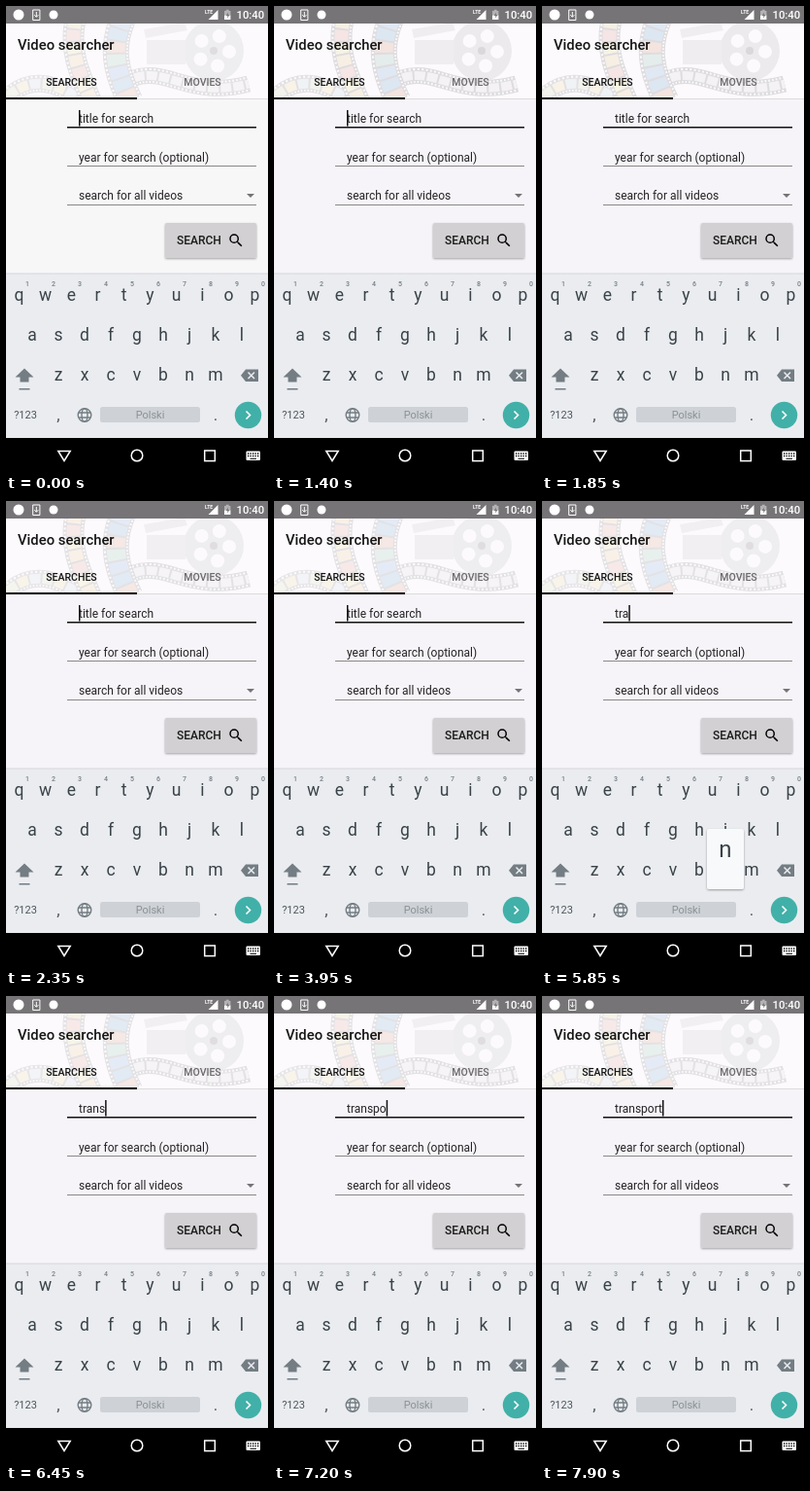
Write an HTML page that moves like this. It is 270 px wide and 480 px high and loops after 8000 ms.

```html
<!DOCTYPE html>
<html>
<head>
<meta charset="utf-8">
<style>
html, body { margin: 0; width: 100%; height: 100%; overflow: hidden; background: #000; }
svg { display: block; width: 270px; height: 480px; font-family: Roboto, sans-serif; }
.mid { text-anchor: middle; }
.med { font-weight: 500; }
.keys { font-size: 17.5px; fill: #394348; text-anchor: middle; }
.hint { font-size: 7px; font-weight: 500; fill: #747e84; }
</style>
</head>
<body>
<svg viewBox="0 0 270 480">
  <defs>
    <clipPath id="bar"><rect y="18" width="270" height="77"/></clipPath>
    <filter id="soft" x="-20%" y="-20%" width="140%" height="150%">
      <feDropShadow dx="0" dy="1" stdDeviation="1" flood-opacity=".35"/>
    </filter>
  </defs>
  <rect id="page" width="270" height="480" fill="#f6f4f8"/>

  <rect y="18" width="270" height="77" fill="#fcfafc"/>
  <g clip-path="url(#bar)"><g id="art"></g></g>
  <rect y="95" width="270" height="1" fill="#dedbde"/>
  <rect y="94" width="135" height="2"/>
  <text class="med" x="12" y="45" font-size="14.8" fill="#151515">Video searcher</text>
  <g class="mid med" font-size="10.5">
    <text x="67.5" y="82" fill="#151515">SEARCHES</text>
    <text x="202.5" y="82" fill="#6c6a6c">MOVIES</text>
  </g>

  <rect width="270" height="18" fill="#767476"/>
  <g fill="#fff">
    <circle cx="13" cy="9" r="5.5"/>
    <path d="M27.7 4h7.2v10.500h-7.200zM31.300 6v5M29.200 9.200l2.100 2.100 2.100-2.100" fill="none" stroke="#fff"/>
    <circle cx="49" cy="9" r="4.5"/>
    <text x="205" y="8" font-size="5" font-weight="700">LTE</text>
    <path d="M218.500 4v10h-10z"/>
    <path d="M225 5h1.800v-1.200h2.800v1.200h1.800v4.500h-6.400z" opacity=".45"/>
    <path d="M225 9.500h6.400v4.500h-6.400z"/>
    <path d="M228.800 6.500l-2 3.500h1.500v2.500l2-3.600h-1.500z" fill="#767476"/>
    <text class="med" x="237.500" y="13.300" font-size="11.300">10:40</text>
  </g>

  <g font-size="12" fill="#242224">
    <text id="field" x="75" y="120"></text>
    <text x="75" y="160">year for search (optional)</text>
    <text x="75" y="199">search for all videos</text>
  </g>
  <rect x="63" y="124" width="195" height="1.500" fill="#111"/>
  <path d="M63 164.500h195M63 204.500h195" stroke="#8a888a"/>
  <path d="M248 193h8l-4 4z" fill="#757375"/>
  <rect id="caret" y="107" width="1.500" height="16.500" fill="#111"/>

  <rect x="164" y="223" width="94" height="36" rx="1.500" fill="#d2d0d2" filter="url(#soft)"/>
  <text class="med" x="176" y="245" font-size="12" fill="#1c1c1c">SEARCH</text>
  <path transform="translate(228 232) scale(.75)" d="M15.500 14h-.79l-.28-.27A6.470 6.470 0 0 0 16 9.500 6.500 6.500 0 1 0 9.500 16c1.610 0 3.090-.59 4.230-1.570l.27.28v.79l5 4.990L20.490 19zm-6 0a4.500 4.500 0 1 1 0-9 4.500 4.500 0 0 1 0 9z"/>

  <rect y="275" width="270" height="169" fill="#eaecf0"/>
  <rect y="274.500" width="270" height="1" fill="#d8d8db"/>
  <g id="keys" class="keys"></g>
  <g fill="#737d83">
    <path d="M19 372.500l9.500 9h-5v5h-9v-5h-5z"/>
    <rect x="13.500" y="393" width="11" height="1.500"/>
    <path d="M247 373.500h13v12.500h-13l-5-6.250z"/>
    <path d="M249.500 376.500l6.500 6.500m0-6.500l-6.500 6.500" stroke="#eaecf0" stroke-width="1.500"/>
  </g>
  <g class="mid" fill="#4d575c">
    <text x="20" y="424" font-size="11">?123</text>
    <text x="54" y="425.500" font-size="17">,</text>
    <text x="216" y="426" font-size="17">.</text>
  </g>
  <g fill="none" stroke="#737d83" stroke-width="1.400">
    <circle cx="81" cy="420.500" r="6.800"/>
    <ellipse cx="81" cy="420.500" rx="3" ry="6.800"/>
    <path d="M75 418h12M75 423h12"/>
  </g>
  <rect x="97" y="412" width="103" height="16" rx="2.500" fill="#ced2d6"/>
  <text class="mid" x="148.500" y="424" font-size="11" fill="#8a9196">Polski</text>
  <circle cx="249.500" cy="420.500" r="13.700" fill="#41b0a8"/>
  <path d="M247.500 416.500l4 4-4 4" fill="none" stroke="#fff" stroke-width="1.600"/>

  <rect y="444" width="270" height="36"/>
  <g fill="none" stroke="#fff" stroke-width="1.500">
    <path d="M53.800 457.500h12.400l-6.200 10z"/>
    <circle cx="135" cy="462" r="5.800"/>
    <rect x="204.700" y="457" width="10.600" height="10.600"/>
  </g>
  <rect x="247.500" y="457.500" width="14.500" height="9.500" rx="1" fill="#fff"/>
  <path d="M249 460h12M249 462.500h12" stroke="#000" stroke-width="1.300" stroke-dasharray="1.300 1.200"/>
  <path d="M251.500 465.300h6.500" stroke="#000"/>

  <g id="popup" class="keys">
    <rect width="38" height="62" rx="2.500" fill="#f7f9fa" filter="url(#soft)"/>
    <text id="glyph" x="19" y="29" font-size="24"></text>
  </g>
</svg>
<script>
const $ = id => document.getElementById(id);

// Faint film strips on the left, a reel with its trailing film on the right
const strip = (path, width, colors, ink) => `<g fill="none">
  <path d="${path}" stroke="${ink}" stroke-width="${width}"/>
  <path d="${path}" stroke="#fff" stroke-width="${width - 2}" stroke-dasharray="1.800 2.200"/>
  <path d="${path}" stroke="${ink}" stroke-width="${width - 6}"/>` +
  colors.map((c, i) => `<path d="${path}" stroke="${c}" stroke-width="${width - 8}"
    stroke-dasharray="11 ${13 * colors.length - 11}" stroke-dashoffset="${-13 * i}"/>`).join('') + '</g>';

const holes = Array.from({length: 5}, (_, i) => {
  const a = i * Math.PI * 2 / 5 - 1.2;
  return `<circle cx="${214 + 16 * Math.cos(a)}" cy="${46 + 16 * Math.sin(a)}" r="7" fill="#fcfafc"/>`;
}).join('');

$('art').innerHTML =
  `<g opacity=".25">${strip('M2 93C25 72 50 78 76 96', 18, ['#d5e2bd', '#eedfa6', '#cfe0e6'], '#98979c')}
  ${strip('M72 12C64 45 76 70 88 98', 22, ['#ecd09a', '#e6aaa4', '#eee3a0'], '#88878c')}
  ${strip('M121 12C108 42 112 66 128 98', 27, ['#8fb5de', '#7fb0d8', '#dda58d', '#9fcabd'], '#88878c')}</g>
  <g opacity=".25"><circle cx="214" cy="46" r="31" fill="#bdbbc0"/>${holes}
  <circle cx="214" cy="46" r="4" fill="#77767b"/>
  <path d="M142 24l42-7 3 8-43 8zM145 35h40v25h-40z" fill="#c9c7cc"/>
  ${strip('M132 74C165 62 190 96 250 80', 17, ['#dddbe0'], '#858489')}</g>`;

// Keyboard rows: letters, first centre, bottom edge
const rows = [['qwertyuiop', 13.5, 317], ['asdfghjkl', 27, 358], ['zxcvbnm', 54, 399]];
const keys = {};
for (const [letters, left, bottom] of rows)
  [...letters].forEach((ch, i) => {
    const x = left + 27 * i;
    keys[ch] = {x, bottom};
    $('keys').innerHTML += `<text x="${x}" y="${bottom - 14}">${ch}</text>` +
      (bottom === 317 ? `<text class="hint" x="${x + 8.5}" y="288">${(i + 1) % 10}</text>` : '');
  });

// Letter, press time, release time
const presses = [
  ['t', 4600, 4700], ['r', 4850, 4950], ['a', 5250, 5400], ['n', 5850, 6000], ['s', 6300, 6450],
  ['p', 6850, 7000], ['o', 7050, 7200], ['r', 7550, 7700], ['t', 7750, 7900]
];

function draw(now) {
  const t = Math.floor(now % 8000 / 50) * 50;
  const typed = presses.filter(p => t >= p[1] + 50).map(p => p[0]).join('');
  $('field').textContent = typed;
  const width = typed ? $('field').getComputedTextLength() : 0;
  if (!typed) $('field').textContent = 'title for search';
  $('caret').setAttribute('x', 75 + width);
  const caretOn = typed || t < 500 || Math.floor((t + 50) / 500) % 2 === 0;
  $('caret').style.opacity = caretOn ? 1 : 0;

  $('page').setAttribute('fill', t < 500 ? '#f8f7f8' : '#f6f4f8');
  $('art').style.opacity = t >= 500 && t < 2000 ? 1 : .85;

  const press = presses.find(p => t >= p[1] && t < p[2]);
  $('popup').style.display = press ? '' : 'none';
  if (press) {
    const {x, bottom} = keys[press[0]];
    $('glyph').textContent = press[0];
    $('popup').setAttribute('transform', `translate(${Math.min(x - 19, 230)} ${bottom - 62})`);
  }
}

const start = performance.now();
function loop() {
  draw(performance.now() - start);
  requestAnimationFrame(loop);
}
loop();
</script>
</body>
</html>
```
